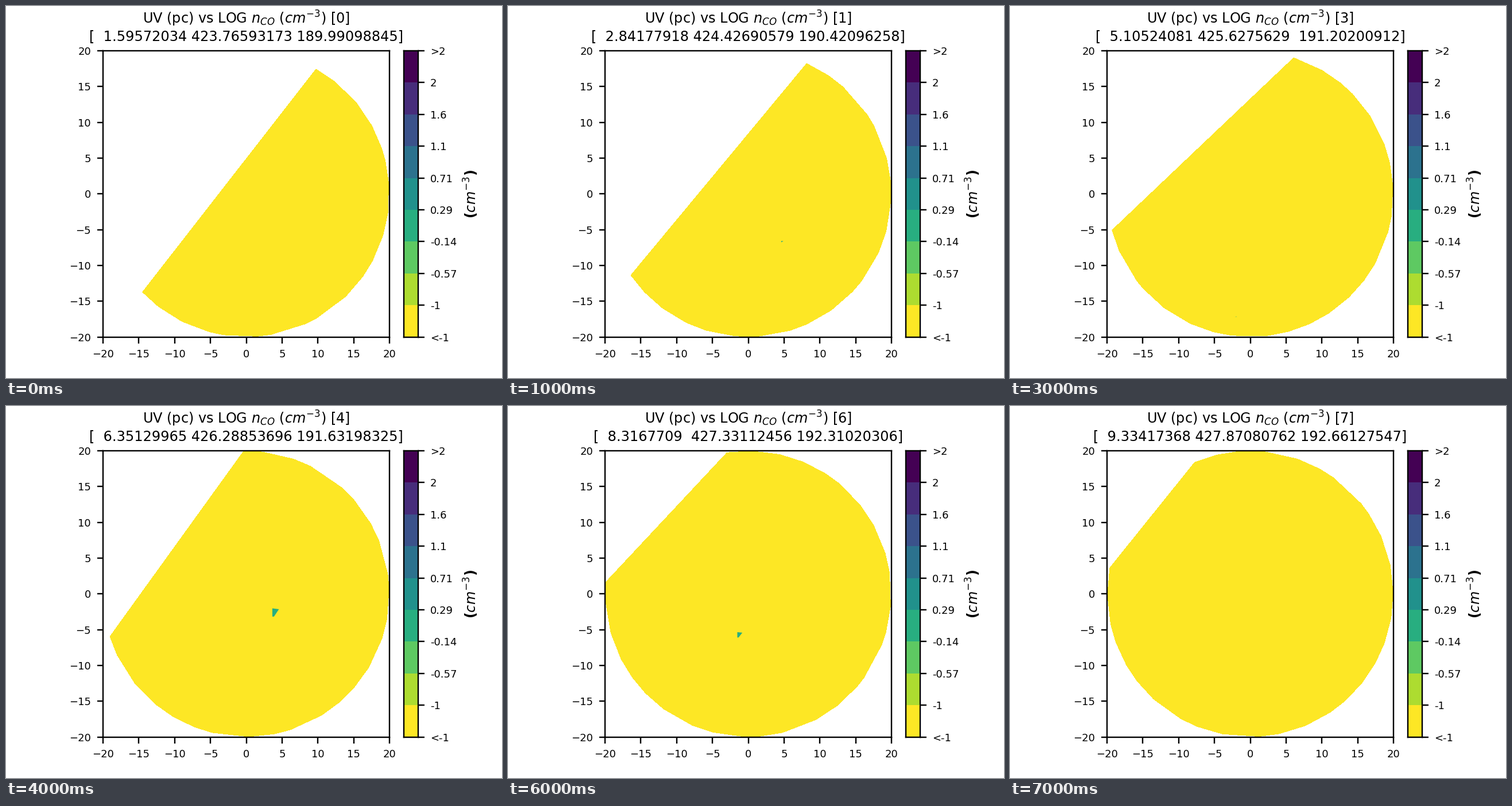
Write a matplotlib script that moves like this. It is 864 by 648 pixels and loops after 8000 ms.

```python
import numpy as np
import matplotlib.pyplot as plt
from matplotlib.animation import FuncAnimation
from matplotlib.patches import Polygon

W, H, DPI = 864, 648, 216
RADIUS = 19.94

# The slice moves along a straight line; DEPTH is its first coordinate
FIRST = np.array([1.59572034, 423.76593173, 189.99098845])
LAST = np.array([9.33417368, 427.87080762, 192.66127547])
DEPTH = [1.59572034, 2.84177918, 3.85918205, 5.10524081,
         6.35129965, 7.36870252, 8.3167709, 9.33417368]
TILT = [52.1, 50.3, 47, 43.5, 54.2, 50, 46.9, 51.2]

# Dense spots per step: centre x, y, width, height
SPOTS = {1: (4.75, -6.66, 0.3, 0.15), 3: (-1.96, -17.16, 0.12, 0.08),
         4: (4.1, -2.6, 0.92, 1.15), 6: (-1.18, -5.72, 0.7, 0.75)}
WEDGE = np.array([(-0.5, 0.5), (0.5, 0.4), (-0.25, -0.5), (-0.5, -0.5)])


def position(n):
    share = (DEPTH[n] - FIRST[0]) / (LAST[0] - FIRST[0])
    return np.round(FIRST + share * (LAST - FIRST), 8)


def cut_disc(n):
    """Corners of the disc left of the cut, clockwise around the rim."""
    half = np.degrees(np.arccos(1.88 * DEPTH[n] / RADIUS))
    normal = TILT[n] + 90
    start, end = normal - half, normal + half - 360
    angles = np.linspace(start, end, round((start - end) / 10) + 1)
    rng = np.random.default_rng(n)
    angles[1:-1] += rng.uniform(-3, 3, len(angles) - 2)
    a = np.radians(angles)
    return RADIUS * np.column_stack([np.cos(a), np.sin(a)])


plt.rcParams["font.family"] = "DejaVu Sans"
plt.rcParams["text.kerning_factor"] = 6
fig = plt.figure(figsize=(W / DPI, H / DPI), dpi=DPI, facecolor="white")

side = 0.77 * H
left = 169.05
ax = fig.add_axes([left / W, 0.11, side / W, 0.77])
ax.set(xlim=(-20, 20), ylim=(-20, 20))
ax.set_xticks(range(-20, 21, 5))
ax.set_yticks(range(-20, 21, 5))
ax.tick_params(labelsize=6)
title = ax.set_title("", fontsize=8, linespacing=1.16)

colors = plt.get_cmap("viridis")(np.linspace(1, 0, 9))
cax = fig.add_axes([(left + 1.05 * side) / W, 0.11, 0.05 * side / W, 0.77])
cax.set(xlim=(0, 1), ylim=(0, 9), xticks=[])
for i, color in enumerate(colors):
    cax.axhspan(i, i + 1, facecolor=color, edgecolor="none", antialiased=False)
cax.yaxis.tick_right()
cax.yaxis.set_label_position("right")
levels = [f"{v:.2g}" for v in np.linspace(-1, 2, 8)]
cax.set_yticks(range(10), ["<-1", *levels, ">2"])
cax.tick_params(labelsize=6)
cax.set_ylabel("($cm^{-3}$)", fontsize=8, fontweight="bold", labelpad=3.2)

disc = ax.add_patch(Polygon([(0, 0)], facecolor=colors[0], edgecolor="none",
                            antialiased=False))
spot = ax.add_patch(Polygon([(0, 0)], facecolor=colors[3], edgecolor="none",
                            zorder=1.5))


def update(n):
    title.set_text(f"UV (pc) vs LOG $n_{{CO}}$ ($cm^{{-3}}$) [{n}]\n"
                   f"{position(n)}")
    disc.set_xy(cut_disc(n))
    spot.set_visible(n in SPOTS)
    if n in SPOTS:
        x, y, w, h = SPOTS[n]
        spot.set_xy(WEDGE * (w, h) + (x, y))
    return [title, disc, spot]


anim = FuncAnimation(fig, update, frames=len(DEPTH), interval=1000,
                     repeat=True, repeat_delay=0, blit=False)
plt.show()
```
